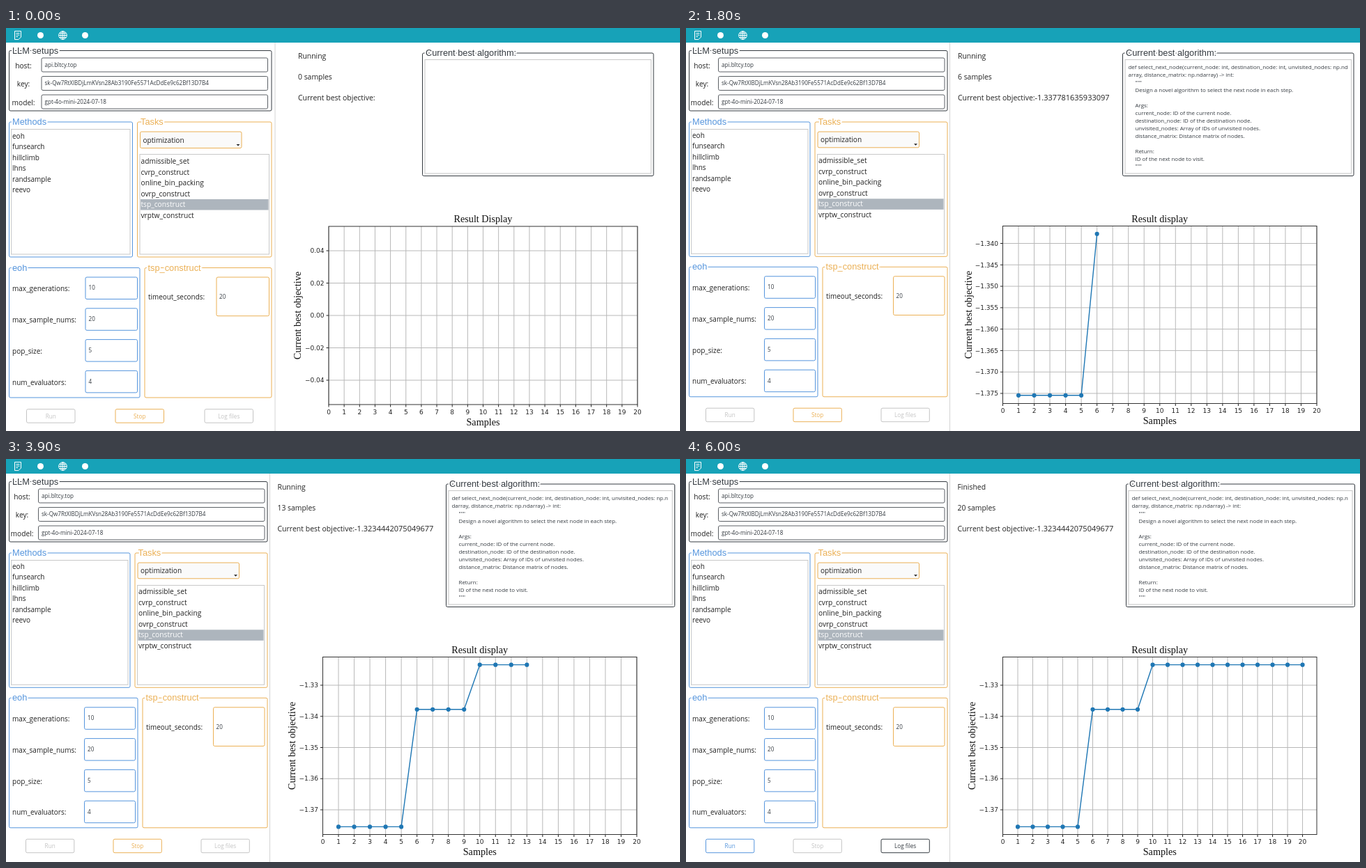
Animation of 967x579 px, one loop 6.3 s. Source, as an HTML page:

```html
<!DOCTYPE html>
<html lang="en">
<head>
<meta charset="utf-8">
<style>
html, body { margin: 0; width: 100%; height: 100%; overflow: hidden; background: #fff; }
svg { display: block; }
text { white-space: pre; }
</style>
</head>
<body>
<svg id="stage" width="967" height="579" viewBox="0 0 967 579"></svg>
<script>
const STEP = 300, STEPS = 21;
const DARK = '#343a40', BLUE = '#5595dd', AMBER = '#ebb055', GREY = '#c4c4c4', PLOT = '#1f77b4';
const UI = "'Open Sans', sans-serif", HEAD = "'Liberation Sans', Arial, sans-serif";
const SERIF = "'Liberation Serif', 'Times New Roman', serif", TICK = "'DejaVu Sans', sans-serif";
const stage = document.getElementById('stage');

// y is the middle of the capitals
const text = (x, y, s, size, fill = '#222', font = UI, more = '') =>
  `<text x="${x}" y="${y + size * 0.36}" font-size="${size}" fill="${fill}" font-family="${font}" ${more}>${s}</text>`;
const mid = 'text-anchor="middle"';
const box = (x1, y1, x2, y2, stroke, fill = 'none', r = 2) =>
  `<rect x="${x1}" y="${y1}" width="${x2 - x1}" height="${y2 - y1}" rx="${r}" fill="${fill}" stroke="${stroke}"/>`;
const line = (x1, y1, x2, y2, stroke, w = 1) =>
  `<path d="M${x1} ${y1}L${x2} ${y2}" stroke="${stroke}" stroke-width="${w}"/>`;
const group = (x1, y1, x2, y2, title, color) => box(x1, y1, x2, y2, color) +
  text(x1 + 4.5, y1 - 0.5, title, 12.8, color, HEAD, 'stroke="#fff" stroke-width="4" paint-order="stroke"');
const button = (x, y, w, label, color, ink = color) =>
  box(x, y, x + w, y + 19.5, color) + text(x + w / 2, y + 10, label, 8.2, ink, UI, mid);

function toolbar() {
  const pen = 'fill="none" stroke="#fff"';
  return `<rect width="967" height="21" fill="#17a2b8"/>
    <path d="M12.5 4.5H21.5V13L18 16.5H12.5ZM14.5 7.5H19.5M14.5 10H19.5M14.5 12.5H17" ${pen}/>
    <circle cx="49.5" cy="10.5" r="4.5" fill="#fff"/>
    <g ${pen}><circle cx="81.5" cy="10.5" r="5.8"/><ellipse cx="81.5" cy="10.5" rx="2.7" ry="5.8"/>
    <path d="M75.7 10.5H87.3M76.7 7.5H86.3M76.7 13.5H86.3M81.5 4.7V16.3"/></g>
    <circle cx="113.5" cy="10.5" r="4.5" fill="#fff"/>`;
}

function leftPanel(n) {
  const at = (first, later) => n ? later : first;
  const done = n === 20;
  const edge = at(381, 375), dy = at(0, -0.7), low = at(0, -1.2);
  let s = line(at(386, 378.5), 21, at(386, 378.5), 579, '#d4d4d4');

  s += group(4.5, 32.5, edge, 119, 'LLM setups', DARK);
  const setup = {
    'host:': 'api.bltcy.top',
    'key:': 'sk-Qw7RtXlBDjLmKVsn28Ab3190Fe5571AcDdEe9c62Bf13D7B4',
    'model:': 'gpt-4o-mini-2024-07-18'
  };
  Object.entries(setup).forEach(([name, value], i) => {
    const y = 53 + i * 26.5;
    s += text(at(25, 23), y + 1, name, 10.2, '#222', UI, mid) +
      box(at(51, 46.5), y - 10, at(375.5, 371), y + 10, '#5c6166') +
      text(at(55.5, 51), y, value, 8.1, DARK);
  });

  s += group(4.5, 135, at(181.5, 178), 329 + dy, 'Methods', BLUE) +
    box(7.5, 145.5, at(178, 175), 325 + dy, '#c8c8c8', 'none', 0);
  ['eoh', 'funsearch', 'hillclimb', 'lhns', 'randsample', 'reevo'].forEach((m, i) => {
    s += text(9, 155 + dy + i * 15.5, m, 10);
  });

  const tx = at(192.5, 189);
  s += group(tx - 4, 135, edge, 329 + dy, 'Tasks', AMBER) +
    box(tx, 149, tx + 145.5, 172.5 + dy, AMBER, '#fafafa') +
    text(tx + 4, 161 + dy, 'optimization', 10.1) +
    `<path d="M${tx + 138} ${167 + dy}h5l-2.5 2.5z" fill="#222"/>` +
    box(tx - 0.5, 181.5, at(377.5, 370.5), 325 + dy, '#c8c8c8', 'none', 0) +
    `<rect x="${tx + 0.5}" y="${246 + dy}" width="${at(183.5, 180)}" height="15.5" fill="#adb5bd"/>`;
  ['admissible_set', 'cvrp_construct', 'online_bin_packing', 'ovrp_construct', 'tsp_construct', 'vrptw_construct']
    .forEach((t, i) => {
      s += text(tx + 1, 191.5 + dy + i * 15.5, t, 10.2, i === 4 ? '#fff' : '#222');
    });

  s += group(4.5, 344.5 + low, at(192, 189), 531 + low, 'eoh', BLUE);
  [['max_generations', 10], ['max_sample_nums', 20], ['pop_size', 5], ['num_evaluators', 4]].forEach(([name, v], i) => {
    const y = 373.5 + low + i * 44.8;
    s += text(9, y + 1, name + ':', 10) +
      box(at(114, 112.5), y - 15.5, at(188.5, 185.5), y + 16, BLUE) +
      text(at(118.5, 117), y, v, 8.1, DARK);
  });

  s += group(at(199, 196), 344.5 + low, edge, 531 + low, 'tsp_construct', AMBER) +
    text(at(204, 201), 386.5 + low, 'timeout_seconds:', 9.9) +
    box(at(302, 297.5), 358 + low, at(377.5, 371), 413.7 + low, AMBER) +
    text(at(306, 301.5), 386 + low, 20, 8.1, DARK);

  const by = at(547.7, 546.2), w = at(69.5, 69.3);
  s += button(at(29.5, 28.5), by, w, 'Run', done ? BLUE : GREY) +
    button(at(157, 154), by, w, 'Stop', done ? GREY : AMBER) +
    button(at(285, 280), by, w, 'Log files', done ? DARK : GREY);
  return s;
}

const best = i => i < 6 ? -1.3754528873457945 : i < 10 ? -1.337781635933097 : -1.3234442075049677;

function status(n) {
  const narrow = n > 5 && n < 10;
  const x = !n ? 419 : narrow ? 390 : 389.5;
  let s = text(x, 40.5, n === 20 ? 'Finished' : 'Running', 10.4) +
    text(x, 70.5, n + ' samples', 10.4) +
    text(x, 100.5, 'Current best objective:', 10.5);
  if (n) s += text(x + 110.5, 100.5, best(n), 11);

  const [x1, x2] = !n ? [597.5, 929] : narrow ? [626.5, 958] : [631.5, 959.5];
  s += group(x1, 36, x2, 212.5, 'Current best algorithm:', DARK) +
    box(x1 + 3.5, 45.5, x2 - 3.5, 209, '#c8c8c8', 'none', 0);
  if (!n) return s;

  const cut = narrow ? 'nd\narray' : 'n\ndarray';
  const code = `def select_next_node(current_node: int, destination_node: int, unvisited_nodes: np.${cut}, distance_matrix: np.ndarray) -&gt; int:
\t"""
\tDesign a novel algorithm to select the next node in each step.

\tArgs:
\tcurrent_node: ID of the current node.
\tdestination_node: ID of the destination node.
\tunvisited_nodes: Array of IDs of unvisited nodes.
\tdistance_matrix: Distance matrix of nodes.

\tReturn:
\tID of the next node to visit.
\t"""`;
  code.split('\n').forEach((row, i) => {
    s += text(x1 + (row[0] === '\t' ? 18 : 8), 56.5 + i * 10.93, row.trim(), 7.95, DARK);
  });
  return s;
}

// top tick value, tick gap, tick count, decimals, y of top tick, pixels per unit, x of axis title
function scale(n) {
  if (!n) return [0.04, 0.02, 5, 2, 320, 2325, 417.5];
  if (n < 6) return [-1.3, 0.02, 8, 2, 284.5, 1690, 409.5];
  if (n < 10) return [-1.34, 0.005, 8, 3, 309.5, 6157, 404];
  return [-1.33, 0.01, 5, 2, 325, 4475, 409.5];
}

function chart(n) {
  const [x0, x1, y0, y1] = n ? [454.5, 905, 284.5, 539.5] : [463, 906, 285, 541];
  const [top, gap, count, digits, topY, unit, labelX] = scale(n);
  const px = i => x0 + (x1 - x0) * i / (n === 20 ? 20.95 : 20);
  const py = v => topY + (top - v) * unit;
  const cx = (x0 + x1) / 2, cy = (y0 + y1) / 2;
  let grid = '', ticks = '', data = '';

  for (let i = 0; i <= 20; i++) {
    grid += line(px(i), y0, px(i), y1, '#b8b8b8');
    ticks += line(px(i), y1, px(i), y1 + 3.5, '#222') + text(px(i), y1 + 10.5, i, 9, '#222', TICK, mid);
  }
  for (let i = 0; i < count; i++) {
    const v = top - i * gap, y = py(v);
    const label = (v < -1e-9 ? '−' : '') + Math.abs(v).toFixed(digits);
    grid += line(x0, y, x1, y, '#b8b8b8');
    ticks += line(x0 - 3.5, y, x0, y, '#222') + text(x0 - 6.5, y, label, 9, '#222', TICK, 'text-anchor="end"');
  }

  const pts = Array.from({ length: n }, (_, i) => [px(i + 1), py(best(i + 1))]);
  data = `<polyline points="${pts.join(' ')}" fill="none" stroke="${PLOT}" stroke-width="1.4"/>` +
    pts.map(([x, y]) => `<circle cx="${x}" cy="${y}" r="3.1" fill="${PLOT}"/>`).join('');

  return grid + ticks + box(x0, y0, x1, y1, '#333', 'none', 0) + data +
    text(cx, 274, n ? 'Result display' : 'Result Display', 14.2, '#111', SERIF, mid) +
    text(cx, y1 + 24.5, 'Samples', 14.2, '#111', SERIF, mid) +
    `<g transform="translate(${labelX + 0.5} ${cy}) rotate(-90)">` +
    text(0, 0, 'Current best objective', 14.3, '#111', SERIF, mid) + '</g>';
}

let shown = -1;
function draw(now) {
  const n = Math.floor(now / STEP) % STEPS;
  if (n !== shown) {
    shown = n;
    stage.innerHTML = toolbar() + leftPanel(n) + status(n) + chart(n);
  }
  requestAnimationFrame(() => draw(performance.now() - start));
}
const start = performance.now();
draw(0);
</script>
</body>
</html>
```
